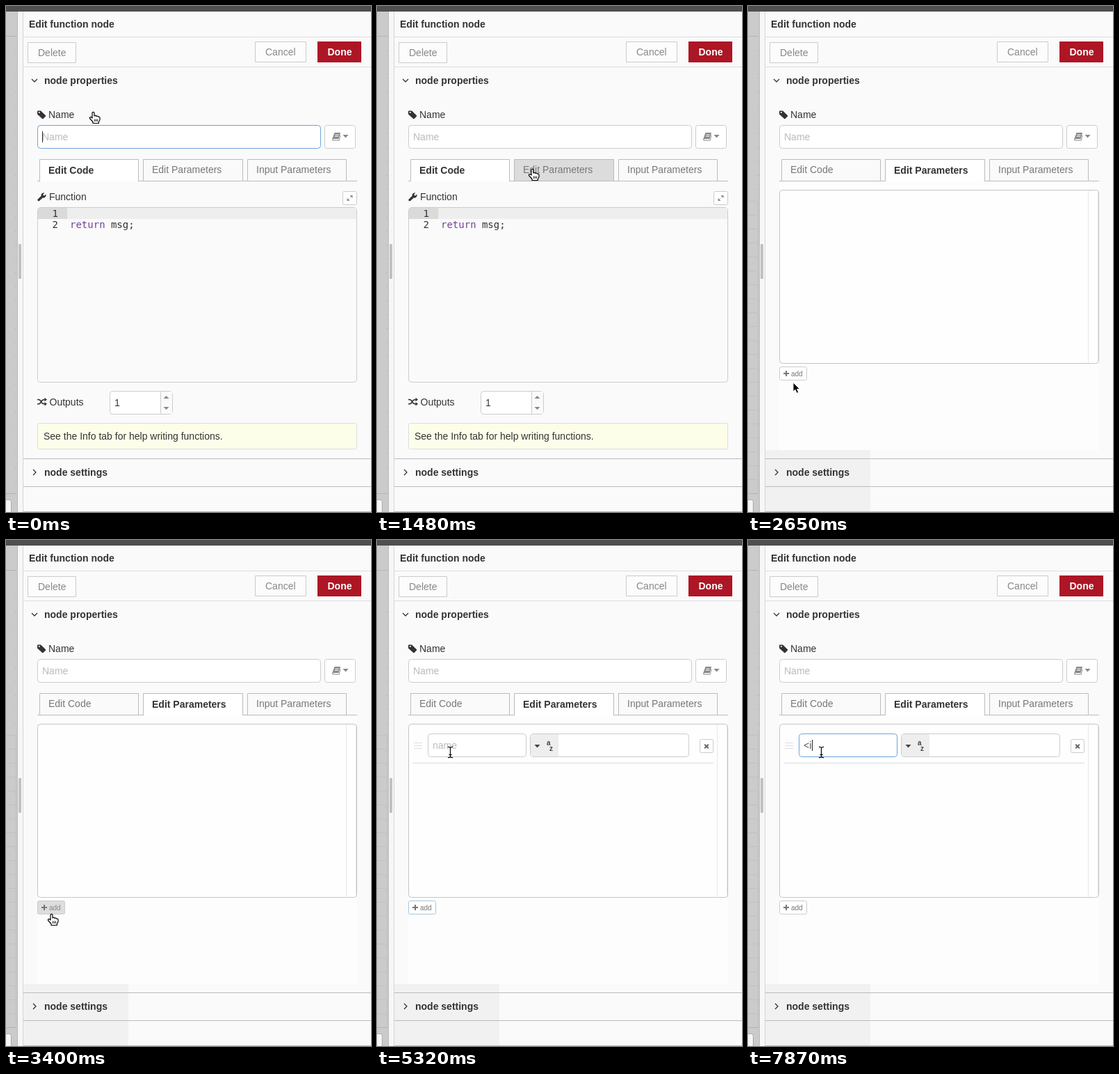
These frames come from a looping animation (525x727 px, 8000 ms). An HTML page with a canvas:

```html
<!DOCTYPE html>
<html lang="en">
<head>
<meta charset="utf-8">
<title>Edit function node</title>
<style>
html, body { margin: 0; width: 100%; height: 100%; overflow: hidden; background: #fafafa; }
canvas { display: block; width: 525px; height: 727px; }
</style>
</head>
<body>
<canvas id="stage" width="525" height="727"></canvas>
<script>
const ctx = document.getElementById('stage').getContext('2d');
const LOOP = 8000;
const SANS = '"Liberation Sans", Arial, sans-serif';
const MONO = '14px "DejaVu Sans Mono", Menlo, monospace';
const REGULAR = '14px ' + SANS;
const BOLD = 'bold 14px ' + SANS;
const INK = '#333', MUTED = '#888', EDGE = '#ccc', FOCUS = '#6ba5dc';

// Pointer glides: start, end, number of steps, then from / bend / to points.
const GLIDES = [
  [440, 1480, 8, 127, 152, 160, 212, 225, 234],
  [1770, 2650, 7, 225, 235, 105, 262, 65, 541],
  [3250, 3400, 2, 65, 541, 66, 538, 67, 537],
  [4440, 5320, 7, 67, 537, 70, 370, 105, 305]
];
const TABS = [['Edit Code', 48], ['Edit Parameters', 197], ['Input Parameters', 347]];

function rect(x, y, w, h, color) {
  ctx.fillStyle = color;
  ctx.fillRect(x, y, w, h);
}

function box(x, y, w, h, radius, fill, edge) {
  ctx.beginPath();
  ctx.roundRect(x + 0.5, y + 0.5, w - 1, h - 1, radius);
  if (fill) { ctx.fillStyle = fill; ctx.fill(); }
  ctx.lineWidth = 1;
  ctx.strokeStyle = edge;
  ctx.stroke();
}

function text(str, x, y, color = INK, font = REGULAR) {
  ctx.font = font;
  ctx.fillStyle = color;
  ctx.fillText(str, x, y);
}

function path(x, y, d, { fill, stroke, width = 1 }) {
  const shape = new Path2D(d);
  ctx.save();
  ctx.translate(x, y);
  ctx.lineWidth = width;
  ctx.lineJoin = 'round';
  if (fill) { ctx.fillStyle = fill; ctx.fill(shape, 'evenodd'); }
  if (stroke) { ctx.strokeStyle = stroke; ctx.stroke(shape); }
  ctx.restore();
}

const triangle = (x, y, h, color = MUTED) =>
  path(x, y, `M-4 0H4L0 ${h}Z`, { fill: color });

const inside = (p, x, y, w, h) => p.x >= x && p.x < x + w && p.y >= y && p.y < y + h;

function pointerAt(t) {
  let x = 127, y = 152;
  for (const [t0, t1, steps, ax, ay, bx, by, cx, cy] of GLIDES) {
    if (t < t0) break;
    const step = Math.floor((t - t0) / (t1 - t0) * (steps - 1) + 0.02) + 1;
    const p = Math.min(1, step / steps);
    const e = p * p * (3 - 2 * p), q = 1 - e;
    x = Math.round(q * q * ax + 2 * q * e * bx + e * e * cx);
    y = Math.round(q * q * ay + 2 * q * e * by + e * e * cy);
  }
  return { x, y };
}

function pointerKind(p, t) {
  if (inside(p, 45, 171, 408, 34)) return 'text';
  if (t >= 3690 && inside(p, 73, 278, 142, 34)) return 'text';
  if (inside(p, 45, 150, 90, 21)) return 'hand';
  if (t >= 3250 && inside(p, 45, 518, 40, 20)) return 'hand';
  return TABS.some(tab => inside(p, tab[1], 220, 144, 32)) ? 'hand' : 'arrow';
}

function drawPointer(p, kind) {
  const { x, y } = p;
  if (kind === 'hand') {
    path(x, y, 'M-3 9V1.5Q-1.5 -.8 0 1.5V6Q1.5 4.6 3 6.4Q4.7 5.2 5.6 7.2Q7.6 6.6 8 8.6V11.5L6.3 14.5V16.5H-2V14.5L-6.5 9.5Q-6.8 7 -4.5 7.6Z',
      { fill: '#fff', stroke: '#000', width: 1.2 });
    path(x, y, 'M.5 10.5V14M2.5 10.5V14M4.5 10.5V14', { stroke: '#000', width: 0.9 });
  } else if (kind === 'text') {
    path(x, y, 'M-3 -7.5Q.5 -8 .5 -5.5Q.5 -8 4 -7.5M.5 -6V6M-3 7.5Q.5 8 .5 5.5Q.5 8 4 7.5M-1.5 3.5H2.5',
      { stroke: '#111', width: 1.3 });
  } else {
    path(x, y, 'M0 0V13L3 10.3L5.2 15.2L7.6 14.2L5.5 9.4H9.4Z',
      { fill: '#000', stroke: '#fff', width: 0.9 });
  }
}

function drawWorkspace(t) {
  rect(0, 0, 525, 727, '#fafafa');
  rect(0, 8, 16, 719, '#cbcbcb');
  rect(0, 43, 15, 1, '#b4b4b4');
  rect(0, 700, 15, 1, '#b4b4b4');
  for (let y = 63; y < 700; y += 20) rect(13, y, 2, 1, '#b5b5b5');
  if (t >= 2210) {
    for (let y = 280; y < 700; y += 20) rect(0, y, 15, 1, '#c1c1c1');
    rect(14, 276, 1, 424, '#c1c1c1');
  }
  box(-6, 709, 14, 24, 3, '#f5f5f5', '#aaa');
  rect(16, 8, 1, 719, '#b8b8b8');
  rect(17, 8, 7, 719, '#f7f7f7');
  rect(24, 8, 1, 719, '#d5d5d5');
  ctx.beginPath();
  ctx.roundRect(18, 342, 4, 50, 1);
  ctx.fillStyle = '#c1c1c1';
  ctx.fill();
  rect(0, 0, 525, 8, '#4f4f4f');
}

function drawPanel(t) {
  if (t >= 2210) rect(25, 638, 151, 88, '#f1f1f1');
  text('Edit function node', 33, 31, INK, BOLD);
  rect(25, 44, 500, 1, '#ddd');
  box(31, 52, 70, 30, 0, '#fcfcfc', EDGE);
  text('Delete', 46, 72, MUTED);
  box(358, 51, 74, 30, 0, '#fcfcfc', EDGE);
  text('Cancel', 373, 71, MUTED);
  rect(448, 51, 63, 30, '#ad1625');
  text('Done', 462.5, 71, '#fff', BOLD);
  rect(25, 87, 500, 1, '#ddd');
  path(41, 107, 'M-4 -2L0 2L4 -2', { stroke: INK, width: 1.3 });
  text('node properties', 55, 112, INK, BOLD);

  rect(25, 650, 500, 1, '#bbb');
  path(41, 670, 'M-2 -4L2 0L-2 4', { stroke: INK, width: 1.3 });
  text('node settings', 55, 675, INK, BOLD);
  rect(25, 690, 500, 1, '#bbb');
  rect(25, 726, 500, 1, '#bbb');
}

function drawNameField(t) {
  const focused = t < 1480;
  path(45, 150, 'M0 1.5Q0 .5 1 .5H5L12 7.2Q12.5 7.8 12 8.4L8.5 12Q7.8 12.5 7.2 12L0 5.5ZM1.7 3A1.1 1.1 0 1 0 3.9 3A1.1 1.1 0 1 0 1.7 3Z', { fill: INK });
  text('Name', 61, 161);
  box(45, 171, 408, 34, 4, '#fff', focused ? FOCUS : EDGE);
  text('Name', 52, 193, '#bbb');
  if (focused && (t < 740 || t >= 1180)) rect(52, 180, 1, 16, '#222');
  box(458, 171, 45, 34, 3, '#fff', EDGE);
  path(469, 182, 'M3.5 0H12L9.5 9H1.5Q.8 10.5 2 10.5H9.8L11.8 3L12.5 3.5L10.5 11.5H2Q-.5 11.5 .3 9ZM4.5 2.5L4.2 3.5H9.5L9.8 2.5ZM3.9 4.7L3.6 5.7H8.9L9.2 4.7Z', { fill: MUTED });
  triangle(488.5, 185, 4.5);
}

function drawTabs(p, active) {
  rect(45, 251, 460, 1, '#bbb');
  TABS.forEach(([label, x], i) => {
    const selected = i === active;
    const hovered = !selected && inside(p, x, 220, 144, 32);
    box(x, 220, i === 1 ? 144 : 143, 32, 0, selected ? '#fff' : hovered ? '#dcdcdc' : '#fafafa', '#bbb');
    if (selected) rect(x + 1, 251, i === 1 ? 142 : 141, 1, '#fff');
    text(label, x + 13, selected ? 241 : 240, selected ? INK : '#777', selected ? BOLD : REGULAR);
  });
}

function drawCodeTab() {
  path(45, 268, 'M.8 9.6L5.5 5Q5 1.2 8.8 .4L10.5 .6L8.3 2.6L8.8 4.2L10.4 4.6L12.5 2.6Q13.2 6.5 9.8 7.7L7.8 7.4L3 12Q1.6 12.8 .7 11.8Q-.2 10.8 .8 9.6Z', { fill: INK });
  text('Function', 62, 279);
  box(484, 266, 21, 20, 2, '#fff', EDGE);
  path(494.5, 276, 'M-3 3L-.8 .8M.8 -.8L3 -3', { stroke: MUTED });
  path(494.5, 276, 'M0 -4H4V0ZM0 4H-4V0Z', { fill: MUTED });

  box(45, 289, 460, 252, 4, '#fafafa', EDGE);
  rect(46, 290, 458, 16, '#eee');
  rect(46, 290, 42, 16, '#dadada');
  text('1', 66.5, 303, INK, MONO);
  text('2', 66.5, 319, INK, MONO);
  text('return', 92, 319, '#704296', MONO);
  text(' msg;', 142.5, 319, INK, MONO);

  path(45, 563, 'M0 2.5H2Q4 2.5 5.5 5.5T10 8.8H11M0 8.8H2Q4 8.8 5.5 5.7T10 2.5H11', { stroke: INK, width: 1.6 });
  path(45, 563, 'M10.5 -.3L14 2.5L10.5 5.3ZM10.5 6L14 8.8L10.5 11.6Z', { fill: INK });
  text('Outputs', 62.5, 574);
  box(149, 553, 91, 34, 4, '#fff', EDGE);
  rect(222, 554, 17, 32, '#fafafa');
  rect(222, 554, 1, 32, EDGE);
  text('1', 156, 575);
  triangle(230.5, 564, -4);
  triangle(230.5, 576, 4);

  box(45, 599, 460, 38, 2, '#fdfee9', '#ddd');
  text('See the Info tab for help writing functions.', 54, 623);
}

function drawRow(t) {
  const focused = t >= 5620;
  for (let y = 291; y <= 299; y += 4) rect(53, y, 12, 1, '#ddd');
  box(73, 278, 142, 34, 4, '#fff', focused ? FOCUS : EDGE);
  const typed = t >= 7870 ? '<i' : t >= 7270 ? '<' : '';
  text(typed || 'name', 80, 300, typed ? '#555' : '#bbb');
  const blank = t >= 5920 && t < 6520 || t >= 6970 && t < 7270 || t >= 7720 && t < 7870;
  if (focused && !blank) rect([80, 88, 92][typed.length], 287, 1, 16, '#222');

  box(220, 278, 229, 34, 4, '#fff', EDGE);
  ctx.beginPath();
  ctx.roundRect(221, 279, 40, 32, [3, 0, 0, 3]);
  ctx.fillStyle = '#eee';
  ctx.fill();
  triangle(230.5, 294, 4.5, '#444');
  text('a', 244, 295, '#444', 'bold 10px ' + SANS);
  text('z', 248, 303, '#444', 'bold 10px ' + SANS);

  box(464, 286, 20, 20, 2, '#fff', EDGE);
  path(474, 296.5, 'M-2.8 -2.8L2.8 2.8M2.8 -2.8L-2.8 2.8', { stroke: '#666', width: 2 });
  rect(51, 320, 433, 1, '#ddd');
}

function drawParameterTab(p, t) {
  rect(45, 252, 460, 386, '#fdfdfd');
  rect(198, 251, 142, 1, '#fff');
  box(45, 264, 460, 250, 4, '#fefefe', '#c5c5c5');
  rect(489, 265, 1, 248, '#e8e8e8');
  rect(503, 267, 1, 244, '#e4e4e4');
  if (t >= 3690) drawRow(t);

  const hovered = t >= 3250 && inside(p, 45, 518, 40, 20);
  const focused = t >= 3690 && t < 5620;
  box(45, 518, 40, 20, 2, hovered ? '#ddd' : '#fff', focused ? '#a9c5df' : EDGE);
  path(55, 528, 'M-4 0H4M0 -4V4', { stroke: '#777', width: 2 });
  text('add', 62, 532, hovered ? '#888' : '#777', '10px ' + SANS);
}

function draw(t) {
  const p = pointerAt(t);
  const editing = t >= 1620;
  drawWorkspace(t);
  drawPanel(t);
  drawNameField(t);
  drawTabs(p, editing ? 1 : 0);
  if (editing) drawParameterTab(p, t);
  else drawCodeTab();
  drawPointer(p, pointerKind(p, t));
}

const start = performance.now();
function tick() {
  draw((performance.now() - start) % LOOP);
  requestAnimationFrame(tick);
}
tick();
</script>
</body>
</html>
```
